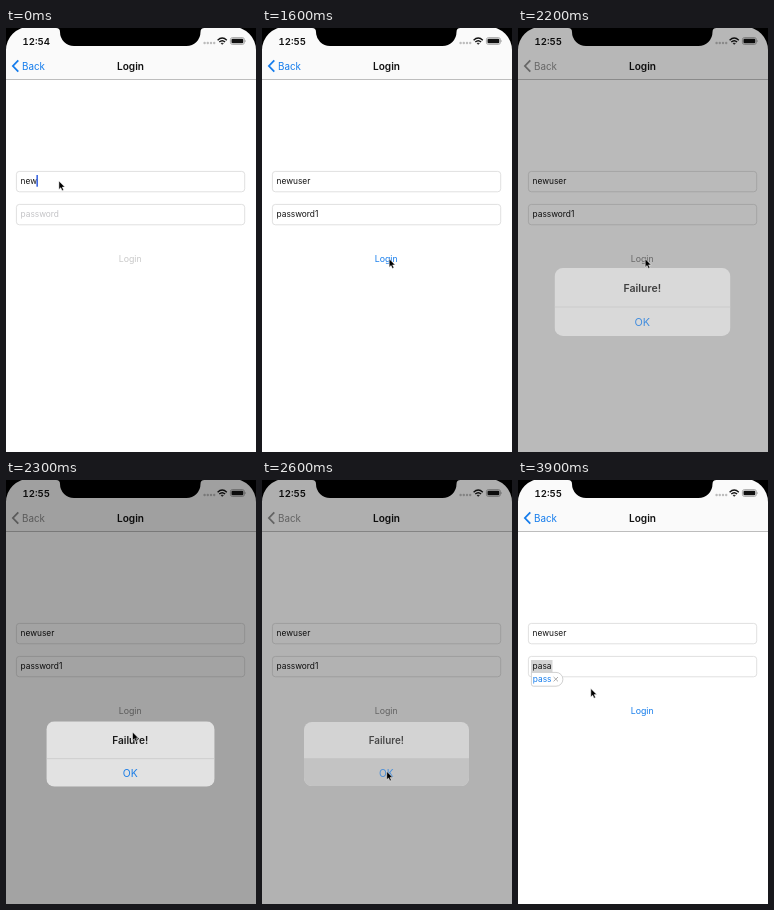
Animation of 250x424 px, one loop 4000 ms. Source, as an HTML page:

```html
<!DOCTYPE html>
<html lang="en">
<head>
<meta charset="utf-8">
<title>Login</title>
<style>
  html, body { margin: 0; width: 100%; height: 100%; overflow: hidden; background: #fff; }
  svg { display: block; width: 100%; height: 100%; font-family: Inter, Roboto, sans-serif; font-size: 8.35px; fill: #111; }
  .tint { fill: #147cec; }
  .semi { font-weight: 600; }
  .mid { text-anchor: middle; }
  .box { fill: #fff; stroke: #d3d3d3; stroke-width: .7; }
  .caret { fill: #3f69e2; }
  #clock { font-variant-numeric: tabular-nums; }
</style>
</head>
<body>
<svg viewBox="0 0 250 424">
  <defs>
    <clipPath id="card"><rect x="42" y="242" width="165" height="64" rx="8"/></clipPath>
  </defs>

  <rect width="250" height="424" fill="#fff"/>
  <rect width="250" height="51" fill="#fafafa"/>
  <rect y="51" width="250" height="1" fill="#bdbdbd"/>

  <text id="clock" class="semi" x="16.5" y="16.5" font-size="9.6"></text>
  <g fill="#bcbcbc">
    <circle cx="198.6" cy="15" r="1.2"/><circle cx="201.8" cy="15" r="1.2"/>
    <circle cx="205" cy="15" r="1.2"/><circle cx="208.2" cy="15" r="1.2"/>
  </g>
  <g fill="none" stroke="#111" stroke-width="1.4">
    <path d="M211.6 12.2Q216.2 8 220.8 12.2M213.3 14Q216.2 11.4 219.1 14"/>
    <path d="M215 15.2h2.4l-1.2 1.2z" fill="#111" stroke-width=".5"/>
  </g>
  <rect x="224.4" y="9.6" width="14" height="6.8" rx="2" fill="none" stroke="#888" stroke-width=".7"/>
  <rect x="225.5" y="10.7" width="11.8" height="4.6" rx="1"/>
  <path d="M239.2 11.8q1.3 1.2 0 2.4z" fill="#888"/>

  <g id="back" class="tint">
    <path d="M12.3 32.4L6.9 38l5.4 5.6" fill="none" stroke="#147cec" stroke-width="1.8"/>
    <text x="16" y="41.6" font-size="9.8">Back</text>
  </g>
  <text class="semi mid" x="124.5" y="41.6" font-size="10.1">Login</text>

  <rect class="box" x="10.4" y="143.4" width="228.3" height="20.4" rx="3"/>
  <rect class="box" x="10.4" y="176.4" width="228.3" height="20.4" rx="3"/>
  <rect id="mark" x="13" y="180" width="21.5" height="12.3" fill="#d4d4d4"/>
  <text id="user" x="14.5" y="156"></text>
  <text id="pass" x="14.5" y="189"></text>
  <text id="hint" x="14.5" y="189" fill="#c3c3c6">password</text>
  <rect id="caret" class="caret" y="147" width="1.6" height="11.7"/>
  <text id="login" class="tint mid" x="124.2" y="233.9" font-size="8.8">Login</text>

  <g id="bubble">
    <path d="M13.4 192.4H38a6.8 6.8 0 0 1 0 13.8H15.5q-2.1 0-2.1-2z" fill="#fff" stroke="#c4c4c4" stroke-width=".8"/>
    <text class="tint" x="14.8" y="202">pass</text>
    <path d="M35.6 197l4.4 4.4m0-4.4l-4.4 4.4" stroke="#999" stroke-width=".8"/>
  </g>

  <rect id="dim" width="250" height="424" fill="#000"/>
  <g id="alert">
    <g clip-path="url(#card)">
      <rect x="42" y="242" width="165" height="64" fill="#e6e6e6"/>
      <rect id="press" x="42" y="279" width="165" height="27" fill="#cdcdcd"/>
      <rect x="42" y="278.4" width="165" height=".6" fill="#c4c4c4"/>
    </g>
    <text class="semi mid" x="124.3" y="264.3" font-size="9.9">Failure!</text>
    <text class="tint mid" x="124.3" y="296.6" font-size="10.2">OK</text>
  </g>

  <path d="M0 0H250V22A23 23 0 0 0 227 -1H23A23 23 0 0 0 0 22Z" fill="#000"/>
  <path d="M50 0a4 4 0 0 1 4 4a14 14 0 0 0 14 14H180.5a14 14 0 0 0 14-14a4 4 0 0 1 4-4z" fill="#000"/>

  <path id="cursor" d="M0 0V8.5L1.9 6.7L3.2 9.7L4.7 9L3.4 6.1H6Z" fill="#000" stroke="#fff" stroke-width=".5"/>
</svg>

<script>
const el = {};
document.querySelectorAll('[id]').forEach(node => el[node.id] = node);

const LOOP = 4000, STEP = 100;
const start = {
  clock: '12:54', user: 'new', pass: '', focus: 'user', caret: 1,
  cursor: [52.9, 153], fade: 1, dim: 0, alert: 0, scale: 1, press: 0, mark: 0, bubble: 0
};

// Each entry lists only what changes at that time.
const steps = [
  [100, { user: 'newu' }],
  [300, { user: 'newuse' }],
  [400, { user: 'newuser' }],
  [600, { focus: 'pass' }],
  [800, { pass: 'pas' }],
  [900, { pass: 'pass' }],
  [1100, { pass: 'passwo' }],
  [1200, { pass: 'password' }],
  [1300, { pass: 'password1', clock: '12:55' }],
  [1400, { cursor: [75, 174] }],
  [1500, { cursor: [117, 220], caret: .5 }],
  [1600, { cursor: [127.2, 230.8], caret: 0 }],
  [1700, { fade: .4 }],
  [1800, { fade: .2 }],
  [1900, { fade: .6 }],
  [2000, { fade: 1 }],
  [2100, { dim: .1, alert: .3, scale: 1.14 }],
  [2200, { dim: .27, alert: .72, scale: 1.066 }],
  [2300, { dim: .36, alert: .94, scale: 1.02, cursor: [126.5, 252] }],
  [2400, { dim: .4, alert: 1, scale: 1, cursor: [125, 284] }],
  [2500, { press: 1, cursor: [124.7, 291.3] }],
  [2600, { dim: .3, alert: .65 }],
  [2700, { dim: .1, alert: .2, cursor: [106, 262] }],
  [2800, { dim: 0, alert: 0, press: 0, cursor: [79, 219], caret: 1 }],
  [2900, { pass: 'password', cursor: [72.8, 208.5] }],
  [3000, { pass: 'passwo' }],
  [3100, { pass: 'pass' }],
  [3200, { pass: 'pas' }],
  [3400, { pass: 'pasa' }],
  [3500, { mark: 1, bubble: .3 }],
  [3600, { bubble: .7 }],
  [3700, { bubble: 1, caret: .6 }],
  [3800, { caret: .25 }],
  [3900, { caret: 0 }]
];

const stateAt = t => Object.assign({}, start, ...steps.filter(([at]) => at <= t).map(([, change]) => change));
const opacity = (name, value) => el[name].setAttribute('opacity', value);
const tint = (node, colour) => { node.style.fill = colour; };

function draw(t) {
  const s = stateAt(t);
  for (const name of ['clock', 'user', 'pass']) el[name].textContent = s[name];
  for (const name of ['dim', 'alert', 'press', 'mark', 'bubble', 'caret']) opacity(name, s[name]);
  opacity('hint', s.pass ? 0 : 1);
  opacity('login', s.fade);

  const width = s[s.focus] ? el[s.focus].getComputedTextLength() : 0;
  el.caret.setAttribute('x', 13.9 + width);
  el.caret.setAttribute('y', s.focus === 'user' ? 147 : 180);

  const behind = s.dim > .05;
  const grey = '#8c8c8c';
  tint(el.login, s.pass.length < 4 ? '#c9c9c9' : behind ? grey : '');
  tint(el.back, behind ? grey : '');
  el.back.firstElementChild.style.stroke = behind ? grey : '';

  el.alert.setAttribute('transform', `translate(124.5 274) scale(${s.scale}) translate(-124.5 -274)`);
  el.cursor.setAttribute('transform', `translate(${s.cursor})`);
}

const began = performance.now();
let shown = -1;
function tick() {
  const t = Math.floor(((performance.now() - began) % LOOP) / STEP) * STEP;
  if (t !== shown) draw(shown = t);
  requestAnimationFrame(tick);
}
tick();
</script>
</body>
</html>
```
